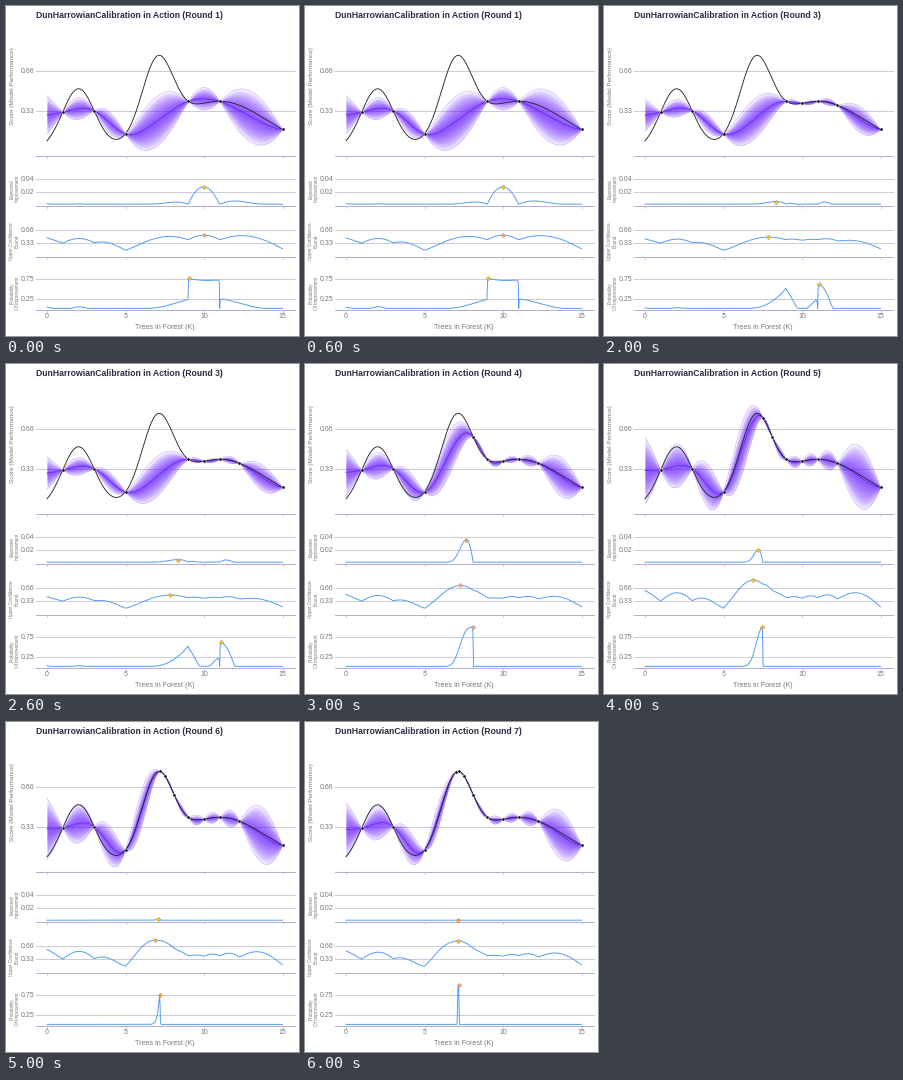
A matplotlib script for the animation above (7 s loop, 293 by 330 pixels).

```python
from math import erf, sqrt

import numpy as np
import matplotlib.pyplot as plt
from matplotlib.animation import FuncAnimation

W, H, DPI = 293, 330, 100
PT = 72 / DPI  # points per pixel

plt.rcParams["font.family"] = "Liberation Sans"

INK = "#2a2a44"
GREY = "#777783"
GRID = "#cbcbd9"
AXIS = "#b3b0d0"
PURPLE = "#6a1bff"
BLUE = "#5299fa"
MARKS = {"g": "#ffc81a", "o": "#ffa640", "p": "#f9a59a"}

START = [1, 3, 5, 9, 11, 15]
ADDED = [10, 12.25, 8.1, 7.5, 7.2, 7.0]
KAPPA = 2.576

# Fitted length scale and deviation of each round, with its marker colours
ROUNDS = [(2.0, .115, "gpg"), (2.0, .11, "ogg"), (2.2, .108, "ggg"),
          (2.0, .14, "opp"), (1.6, .166, "ggo"), (1.65, .155, "ggo"),
          (1.75, .144, "ogp")]

# Panels: zero row, pixels per unit, axis row, ticks, side label
SCORE = (144, 121.2, 149.5, (.66, .33), "Score (Model Performance)")
EI = (198.2, 650, 199.5, (.04, .02), "Expected\nImprovement")
UCB = (249.5, 39.4, 250.5, (.66, .33), "Upper Confidence\nBound")
POI = (302.4, 39.3, 304.2, (.75, .25), "Probability\nOf Improvement")

XS = np.linspace(0, 15, 601)


def to_px(x):
    return 41 + 15.7 * np.asarray(x, float)


def to_row(panel, value):
    return panel[0] - panel[1] * value


def truth(x):
    """The hidden score: three bell curves."""
    x = np.asarray(x, float)
    return sum(h * np.exp(-((x - c) / w) ** 2)
               for h, c, w in [(.5, 2, 1.456), (.605, 7.03, 1.378),
                               (.402, 11, 4.31)])


def matern(a, b, length):
    r = sqrt(5) * np.abs(np.subtract.outer(a, b)) / length
    return (1 + r + r * r / 3) * np.exp(-r)


def fit(obs, length, sigma):
    """Gaussian process mean and deviation over XS."""
    seen = truth(obs)
    inv = np.linalg.inv(matern(obs, obs, length) + 1e-8 * np.eye(len(obs)))
    trend = (inv @ seen).sum() / inv.sum()
    cross = matern(XS, obs, length)
    mean = trend + cross @ inv @ (seen - trend)
    var = 1 - np.einsum("ij,jk,ik->i", cross, inv, cross)
    return mean, np.maximum(sigma * np.sqrt(np.maximum(var, 0)), 1e-4)


def improvement(mean, dev, best):
    """Expected improvement and its probability."""
    z = (mean - best) / dev
    chance = np.array([.5 + .5 * erf(v / sqrt(2)) for v in z])
    density = np.exp(-z * z / 2) / sqrt(2 * np.pi)
    return (mean - best) * chance + dev * density, chance


fig = plt.figure(figsize=(W / DPI, H / DPI), dpi=DPI, facecolor="white")
ax = fig.add_axes([0, 0, 1, 1])


def line(x, y, color, width, **kw):
    ax.plot(x, y, color=color, lw=width * PT, **kw)


def label(x, y, text, size, color=GREY, ha="center", va="center_baseline", **kw):
    ax.text(x, y, text, fontsize=size * PT, color=color, ha=ha, va=va, **kw)


def draw_axes():
    for panel in (SCORE, EI, UCB, POI):
        base, ticks, name = panel[2:]
        for value in ticks:
            y = np.floor(to_row(panel, value)) + .5
            line([30, 289], [y, y], GRID, 1, zorder=1)
            label(28.8, y, f"{value:.2f}", 7, ha="right")
        line([30, 289], [base, base], AXIS, 1, zorder=1)
        for x in to_px([0, 5, 10, 15]):
            line([x, x], [base, base + 2.5], AXIS, .7, zorder=1)
        two_rows = "\n" in name
        middle = to_row(panel, np.mean(ticks)) if two_rows else 79.8
        label(8.5 if two_rows else 7, middle + (5 if panel is UCB else 4) * two_rows,
              name, 4.6 if two_rows else 6.4, va="center", rotation=90,
              linespacing=1)
    for x in (0, 5, 10, 15):
        label(to_px(x), 309.7, str(x), 7)
    label(158.5, 320.2, "Trees in Forest (K)", 7.1)


def draw_score(px, mean, dev, obs):
    layers = 22
    for s in KAPPA * np.arange(layers, 0, -1) / layers:
        ax.fill_between(px, to_row(SCORE, mean - s * dev),
                        to_row(SCORE, mean + s * dev),
                        color=PURPLE, alpha=.055, lw=0, zorder=2)
    for s in (-KAPPA, KAPPA):
        line(px, to_row(SCORE, mean + s * dev), PURPLE, .6, alpha=.35, zorder=3)
    line(px, to_row(SCORE, mean), "#6a2bf0", .8, zorder=4)
    line(px, to_row(SCORE, truth(XS)), "#26262c", .9, zorder=5)
    ax.plot(to_px(obs), to_row(SCORE, truth(obs)), "o", ms=3.2 * PT,
            mfc="black", mec="white", mew=.5 * PT, zorder=6)


def update(k):
    ax.clear()
    ax.set(xlim=(0, W), ylim=(H, 0))
    ax.axis("off")
    length, sigma, marks = ROUNDS[k]
    obs = sorted(START + ADDED[:k])
    mean, dev = fit(obs, length, sigma)
    gain, chance = improvement(mean, dev, truth(obs).max())
    px = to_px(XS)

    draw_axes()
    label(30, 8.5, f"DunHarrowianCalibration in Action (Round {k + 1})", 8.6,
          INK, ha="left", weight="bold")
    draw_score(px, mean, dev, obs)

    curves = [(EI, gain), (UCB, mean + KAPPA * dev), (POI, chance)]
    for (panel, values), mark in zip(curves, marks):
        rows = to_row(panel, values)
        line(px, rows, BLUE, .95, zorder=4)
        top = values.argmax()
        ax.plot(px[top], rows[top], "D", ms=3 * PT, mfc=MARKS[mark],
                mec="#b08f52", mew=.5 * PT, zorder=7)
    return []


anim = FuncAnimation(fig, update, frames=len(ROUNDS), interval=1000,
                     init_func=lambda: update(0), repeat=True,
                     repeat_delay=0, blit=False)
plt.show()
```
